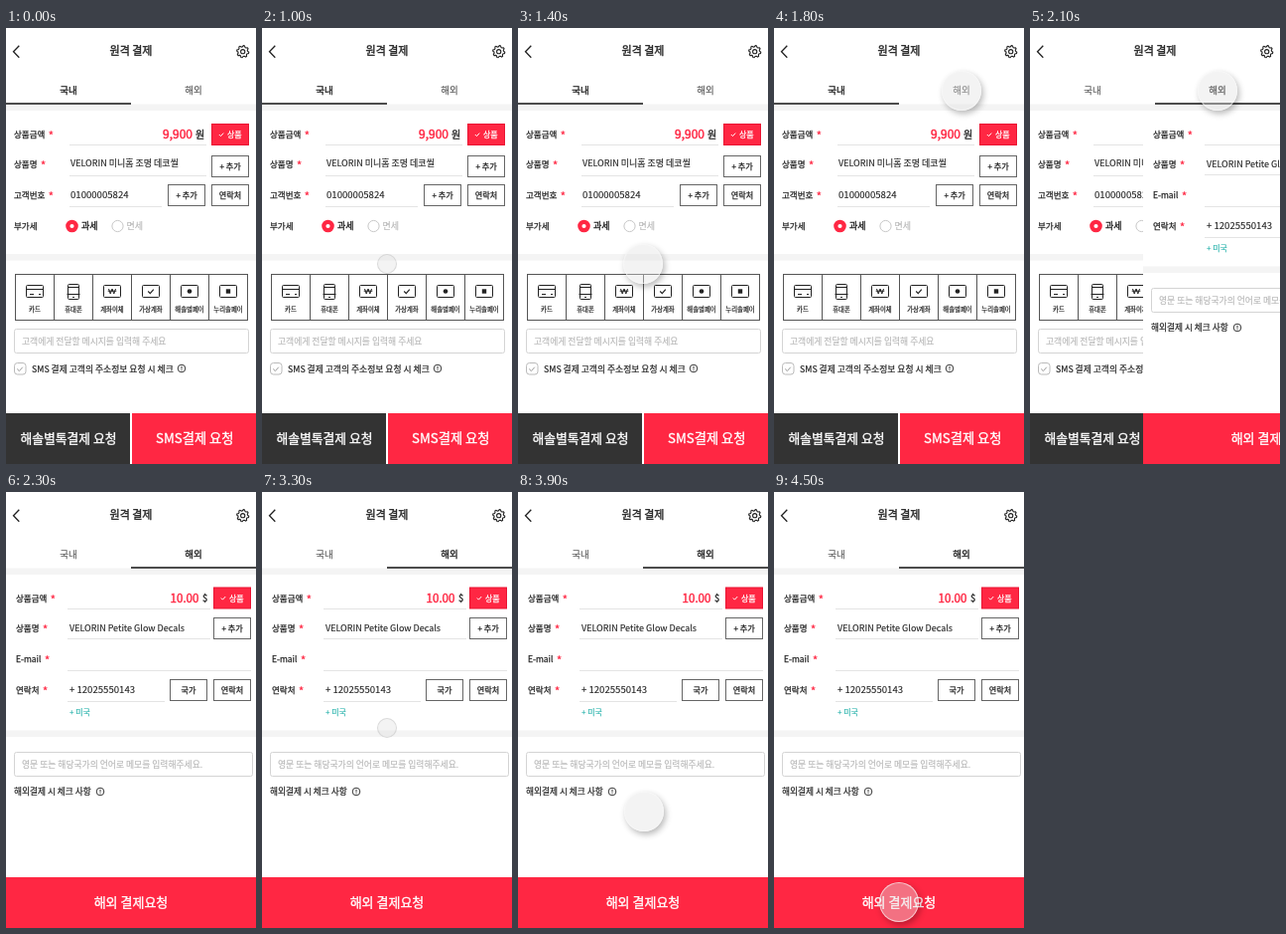
These frames come from a looping animation (252 px wide and 438 px high, 6 s). An HTML page:

```html
<!DOCTYPE html>
<html>
<head>
<meta charset="utf-8">
<title>원격 결제</title>
<style>
  html, body { margin: 0; width: 100%; height: 100%; overflow: hidden; background: #fff; }
  svg { position: absolute; left: 0; top: 0; }
  text { font-family: 'Noto Sans CJK KR', 'Noto Sans CJK', 'Noto Sans', sans-serif; white-space: pre; }
  #touch {
    position: absolute; box-sizing: border-box; border-radius: 50%;
    background: rgba(226, 226, 226, .4); border: 1px solid rgba(248, 248, 248, .65);
  }
  #touch.small { border-color: rgba(200, 200, 200, .6); }
  #touch.full { box-shadow: 2px 3px 6px rgba(0, 0, 0, .28); }
</style>
</head>
<body>
<svg id="stage" width="252" height="438" viewBox="0 0 252 438"></svg>
<div id="touch"></div>
<script>
const RED = '#ff2743', INK = '#222', PALE = '#b6b6b6';
const MEDIUM = .35; // outline that thickens the regular weight

const text = (x, y, size, str, fill = INK, anchor = 'start', heft = .12) =>
  `<text x="${x}" y="${y}" font-size="${size}" fill="${fill}" stroke="${fill}" stroke-width="${heft}" text-anchor="${anchor}">${str}</text>`;
const rect = (x, y, w, h, fill, stroke = 'none', r = 0) =>
  `<rect x="${x}" y="${y}" width="${w}" height="${h}" rx="${r}" fill="${fill}" stroke="${stroke}"/>`;
const path = (d, stroke = INK, width = 1) =>
  `<path d="${d}" fill="none" stroke="${stroke}" stroke-width="${width}"/>`;
const circle = (x, y, r, fill, stroke = 'none', width = 1) =>
  `<circle cx="${x}" cy="${y}" r="${r}" fill="${fill}" stroke="${stroke}" stroke-width="${width}"/>`;
const rule = (x1, x2, y) => path(`M${x1} ${y + .5}H${x2}`, '#e4e4e4');
const tick = (x, y, s, stroke, width = 1) =>
  path(`M${x - s} ${y}l${s * .75} ${s * .75}l${s * 1.25} ${-s * 1.4}`, stroke, width);

const label = (x, y, str, required = true) => text(x, y, 8.5,
  str + (required ? `<tspan dx="3.5" dy="2" font-size="11" fill="${RED}" stroke="${RED}">*</tspan>` : ''),
  INK, 'start', .25);
const button = (x, y, str) =>
  rect(x + .5, y + .5, 37, 21, '#fff', '#666') + text(x + 19, y + 14.2, 8.1, str, INK, 'middle', .25);
const goodsButton = (x, y) =>
  rect(x + .5, y + .5, 37, 21, RED, '#ea1433') + tick(x + 10, y + 11, 2.2, '#fff') +
  text(x + 16, y + 14.2, 8, '상품', '#fff', 'start', .25);
const input = (y, w, str) =>
  rect(8.5, y + .5, w, 24, '#fff', '#d4d4d4', 2) + text(16, y + 15.5, 8.8, str, PALE);
const info = (x, y) =>
  circle(x, y, 3.8, 'none', INK, .9) + path(`M${x} ${y - 2.2}v2.7m0 .8v1`, INK, .9);
const band = (y, h = 6.5) => rect(0, y, 252, h, '#f4f4f4');

function gear(cx, cy) {
  const points = [];
  for (let i = 0; i < 32; i++) {
    const a = (i + .5) * Math.PI / 16, r = i % 4 < 2 ? 6.1 : 4.8;
    points.push((cx + r * Math.sin(a)).toFixed(2) + ' ' + (cy - r * Math.cos(a)).toFixed(2));
  }
  return path('M' + points.join('L') + 'Z', INK, 1.1) + circle(cx, cy, 2.1, 'none', INK, 1.1);
}

function payMethods() {
  const names = ['카드', '휴대폰', '계좌이체', '가상계좌', '해솔별페이', '누리솔페이'];
  const card = x => rect(x - 8.5, 258.5, 17, 12, 'none', INK, 1);
  const icons = [
    x => card(x) + path(`M${x - 8.5} 262.5h17M${x - 5} 267.5h4M${x + 4} 267.5h2`),
    x => rect(x - 5.5, 257.5, 11, 15, 'none', INK, 1) + path(`M${x - 5.5} 260.5h11M${x - 6.5} 267.5h13M${x - 1} 270.5h2`),
    x => card(x) + path(`M${x - 3.5} 262l1.7 5l1.8-5l1.8 5l1.7-5M${x - 4.3} 264.2h8.6`),
    x => card(x) + tick(x, 264.5, 2.8, INK, 1.2),
    x => card(x) + circle(x, 264.5, 2.3, INK),
    x => card(x) + rect(x - 2.2, 262.3, 4.4, 4.4, INK)
  ];
  return rect(9.5, 247.5, 234, 46, '#fff', '#555') + names.map((name, i) => {
    const x = 29 + i * 39;
    return (i ? path(`M${x - 19.5} 247v47`, '#555') : '') + icons[i](x) + text(x, 285.2, 6.4, name, INK, 'middle', .2);
  }).join('');
}

const header =
  path('M13.3 17.7L7.5 23.7L13.3 29.7', INK, 1.3) +
  text(126, 27.3, 11, '원격 결제', INK, 'middle', MEDIUM) + gear(238.7, 23.7);

function tabs(active) {
  const tab = (i, str) => i === active
    ? text(63 + i * 126, 66.3, 9.5, str, INK, 'middle', MEDIUM)
    : text(63 + i * 126, 66.3, 9.5, str, '#555', 'middle');
  return tab(0, '국내') + tab(1, '해외') + band(76.5) + rect(active * 126, 75.2, 126, 1.6, INK);
}

const domestic =
  label(8, 110, '상품금액') + text(188, 111, 12, '9,900', RED, 'end', .45) + text(191, 111, 10, '원', INK, 'start', MEDIUM) +
  rule(64, 202, 117) + goodsButton(207, 96) +
  label(8, 140.3, '상품명') + text(65, 139, 9, 'VELORIN 미니홈 조명 데코씰') + rule(64, 202, 148) + button(207, 128, '+ 추가') +
  label(8, 171, '고객번호') + text(65, 171, 9.6, '01000005824') + rule(64, 157, 179) +
  button(163, 157, '+ 추가') + button(207, 157, '연락처') +
  label(8, 201.5, '부가세', false) +
  circle(66.5, 199, 4.2, '#fff', RED, 4.2) + text(76, 202.3, 9, '과세', INK, 'start', MEDIUM) +
  circle(112.5, 199, 5.6, '#fff', '#c8c8c8') + text(121.5, 202.3, 9, '면세', PALE) +
  band(227) + payMethods() +
  input(302, 236, '고객에게 전달할 메시지를 입력해 주세요') +
  rect(8.5, 336.5, 11.5, 11.5, '#fff', '#bbb', 3) + tick(14, 342.5, 2.8, '#999') +
  text(26, 345.5, 8.8, 'SMS 결제 고객의 주소정보 요청 시 체크', INK, 'start', .2) + info(177, 342) +
  rect(0, 387, 125, 51, '#333') + rect(127, 387, 125, 51, RED) +
  text(63, 416.5, 12.8, '해솔별톡결제 요청', '#fff', 'middle', MEDIUM) +
  text(190.3, 416.5, 13.3, 'SMS결제 요청', '#fff', 'middle', MEDIUM);

const overseas =
  rect(0, 83, 252, 355, '#fff') +
  label(10, 110, '상품금액') + text(194.5, 110.5, 11.6, '10.00', RED, 'end', .45) + text(198, 110, 9.5, '$', INK, 'start', MEDIUM) +
  rule(62, 206, 117) + goodsButton(209, 95.5) +
  label(10, 140.3, '상품명') + text(64, 140.3, 9, 'VELORIN Petite Glow Decals') + rule(62, 206, 147) + button(209, 126, '+ 추가') +
  label(10, 171, 'E-mail') + rule(62, 247, 179) +
  label(10, 202, '연락처') + text(64, 202, 9.6, '+ 12025550143') + rule(62, 160, 210) +
  button(165, 188, '국가') + button(209, 188, '연락처') +
  text(64, 224.3, 8, '+ 미국', '#1aaea6') +
  band(239.5) + input(261, 240, '영문 또는 해당국가의 언어로 메모를 입력해주세요.') +
  text(8, 304.3, 8.7, '해외결제 시 체크 사항', INK, 'start', .2) + info(95, 301) +
  rect(0, 387, 252, 51, RED) + text(126, 416.5, 13, '해외 결제요청', '#fff', 'middle', MEDIUM);

document.getElementById('stage').innerHTML =
  `${header}<g id="tabs0">${tabs(0)}</g><g id="tabs1">${tabs(1)}</g>${domestic}<g id="overseas">${overseas}</g>`;
const [tabs0, tabs1, sheet, touch] = ['tabs0', 'tabs1', 'overseas', 'touch'].map(id => document.getElementById(id));

// Touch poses: start time, centre x, centre y, radius
const poses = [
  [0, 0, 0, 0],
  [1000, 126, 237, 10], [1200, 126, 237, 15], [1400, 126, 237, 20],
  [1600, 161, 148, 20], [1800, 189, 63, 20], [2300, 0, 0, 0],
  [3300, 126, 237, 10], [3500, 126, 237, 15], [3700, 126, 237, 20],
  [3900, 127, 321, 20], [4100, 126, 412, 20], [4300, 126, 412, 15], [4500, 126, 412, 20]
];
const show = (el, on) => { el.style.display = on ? '' : 'none'; };

function draw(now) {
  const t = now % 6000, swapped = t >= 2000;
  show(tabs0, !swapped);
  show(tabs1, swapped);
  show(sheet, swapped);
  // The overseas sheet slides in by equal steps
  const step = Math.min(3, Math.floor((t - 2000) / 100));
  sheet.setAttribute('transform', `translate(${57 * (3 - step)} 0)`);

  const [, x, y, r] = poses.filter(p => p[0] <= t).pop();
  show(touch, r > 0);
  touch.className = r < 20 ? 'small' : 'full';
  Object.assign(touch.style, { left: x - r + 'px', top: y - r + 'px', width: 2 * r + 'px', height: 2 * r + 'px' });
}

const start = performance.now();
function loop() {
  draw(performance.now() - start);
  requestAnimationFrame(loop);
}
loop();
</script>
</body>
</html>
```
